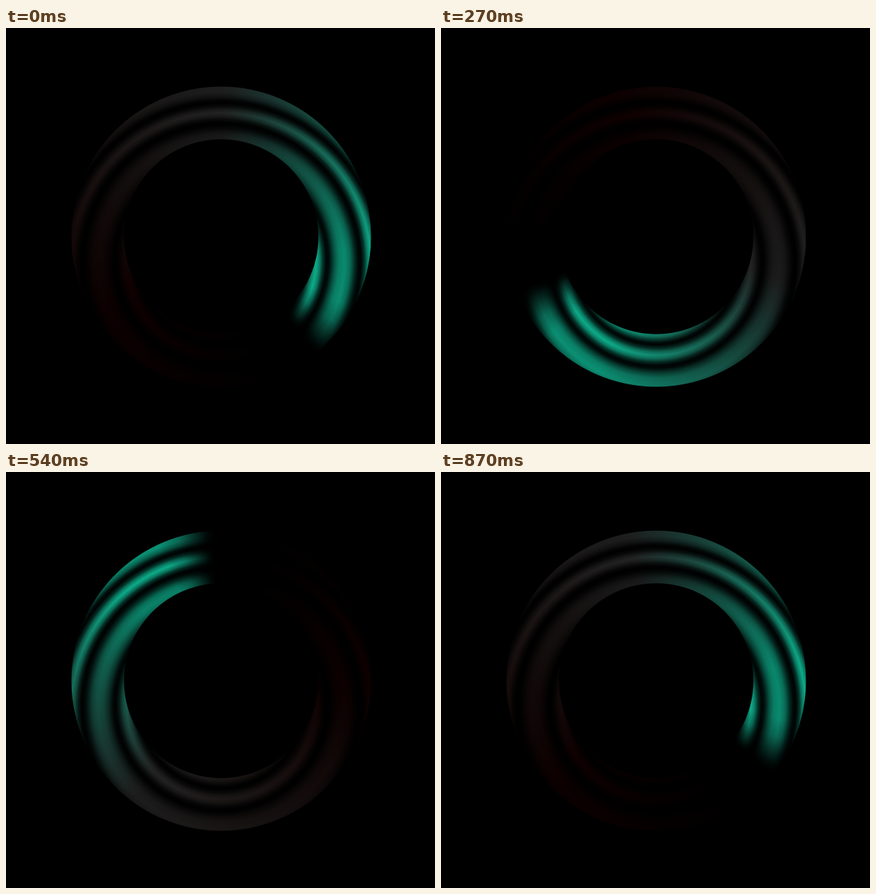
An HTML page that plays this animation: 620 px wide and 600 px high, repeating every 900 ms.

```html
<!DOCTYPE html>
<html lang="en">
<head>
<meta charset="utf-8">
<title>Glossy ring loader</title>
<style>
  html, body {
    margin: 0;
    width: 100%;
    height: 100%;
    overflow: hidden;
    background: #000;
  }
  .stage {
    position: relative;
    width: 620px;
    height: 600px;
    overflow: hidden;
    background: #000;
  }
  .ring {
    position: absolute;
    left: 93.5px;
    top: 83.5px;
    width: 434px;
    height: 434px;
    --hole: radial-gradient(circle, #0000 140px, #000 141px 216px, #0000 217px);
    -webkit-mask: var(--hole);
    mask: var(--hole);
  }
  .glow, .shade {
    position: absolute;
    inset: 0;
  }
  .glow {
    border-radius: 50%;
    background: conic-gradient(from 141deg,
      #000 0deg 15deg, rgb(17 1 1) 98deg, rgb(36 36 36) 220deg,
      rgb(14 172 138) 315deg 338deg, rgb(12 128 104) 346deg,
      rgb(8 62 50) 352deg, rgb(2 14 11) 357deg, #000 360deg);
    animation: spin 900ms steps(30) infinite;
  }
  /* Fixed grooves: two concentric pairs, both centred below the ring's middle */
  .outer {
    background: radial-gradient(circle at 217px 254.5px,
      rgb(0 0 0 / 0) 165px, rgb(0 0 0 / .1) 178px, rgb(0 0 0 / .35) 186px,
      rgb(0 0 0 / .75) 193px, rgb(0 0 0 / .95) 198px, rgb(0 0 0 / .98) 202px,
      rgb(0 0 0 / .7) 207px, rgb(0 0 0 / .3) 211px, rgb(0 0 0 / 0) 216px,
      rgb(0 0 0 / .3) 221px, rgb(0 0 0 / .7) 225px, rgb(0 0 0 / .98) 230px,
      rgb(0 0 0 / .9) 234px, rgb(0 0 0 / .45) 240px, rgb(0 0 0 / .18) 246px,
      rgb(0 0 0 / .14) 254px);
  }
  .inner {
    background: radial-gradient(circle at 217px 251px,
      rgb(0 0 0 / .05) 106px, rgb(0 0 0 / .2) 110px, rgb(0 0 0 / .55) 114px,
      rgb(0 0 0 / .92) 119px, rgb(0 0 0 / .97) 122px, rgb(0 0 0 / .7) 127px,
      rgb(0 0 0 / .25) 132px, rgb(0 0 0 / 0) 137px, rgb(0 0 0 / .25) 142px,
      rgb(0 0 0 / .7) 147px, rgb(0 0 0 / .97) 152px, rgb(0 0 0 / .92) 156px,
      rgb(0 0 0 / .55) 163px, rgb(0 0 0 / .25) 170px, rgb(0 0 0 / .08) 180px,
      rgb(0 0 0 / 0) 190px);
  }
  @keyframes spin {
    to { transform: rotate(360deg); }
  }
</style>
</head>
<body>
<div class="stage">
  <div class="ring">
    <div class="glow"></div>
    <div class="shade outer"></div>
    <div class="shade inner"></div>
  </div>
</div>
</body>
</html>
```
